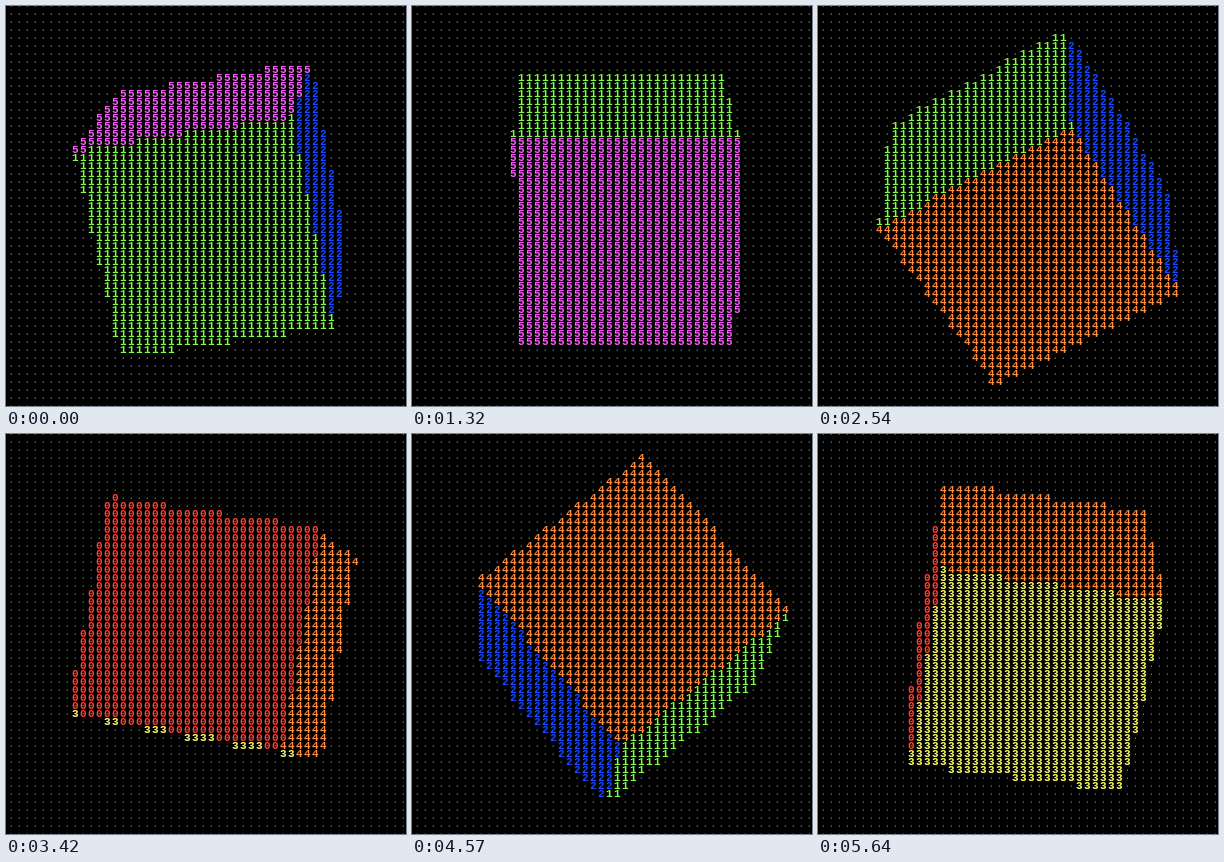
Recreate the animation shown at these times as an HTML page with a canvas. Size 400 px wide and 400 px high, loop 5740 ms.

```html
<!DOCTYPE html>
<html lang="en">
<head>
<meta charset="utf-8">
<title>Digit cube</title>
<style>
  html, body { margin: 0; width: 100%; height: 100%; overflow: hidden; background: #000; }
  canvas { display: block; width: 400px; height: 400px; }
</style>
</head>
<body>
<canvas id="stage" width="400" height="400"></canvas>
<script>
const ctx = document.getElementById('stage').getContext('2d');
const LOOP = 5740, LAST = 97;
const CELL = 8, COLS = 50, ROWS = 51;
const CENTER = [212, 199.5], HALF = 105.5, DEPTH = 18;
const COLORS = ['#ff4438', '#80ff48', '#1848ff', '#ffff68', '#ff9044', '#ff5cff'];
const DOT = '#626262';

// step number and the time in ms at which it appears
const BEATS = [[0, 0], [10, 580], [22, 1270], [33, 1900], [44, 2540], [52, 3010], [59, 3420],
  [63, 3650], [72, 4170], [79, 4570], [83, 4810], [92, 5350], [LAST, 5640]];

// Rounds up early, so that a step is on screen when its time comes.
function stepAt(ms) {
  for (let i = 1; i < BEATS.length; i++) {
    const [s0, t0] = BEATS[i - 1], [s1, t1] = BEATS[i];
    if (ms < t1) return Math.floor(s0 + (s1 - s0) * (ms - t0) / (t1 - t0) + 0.3);
  }
  return LAST;
}

const rad = deg => deg * Math.PI / 180;
const mix = (a, p, b, q) => p.map((v, i) => a * v + b * q[i]);
const neg = v => v.map(n => -n);
const dot = (p, q) => p[0] * q[0] + p[1] * q[1] + p[2] * q[2];

// Outward normals of faces 0..5; x right, y down, z towards the viewer.
function normals(step) {
  const tilt = rad(13.4 + 7.18 * step);
  const spin = rad(123.3 + 5.36 * step);
  const roll = rad(129.3 - 3.6 * step);
  const x = [1, 0, 0];
  const u = [0, Math.cos(roll), Math.sin(roll)];
  const v = [0, -Math.sin(roll), Math.cos(roll)];
  const p = mix(Math.sin(tilt), x, -Math.cos(tilt), u);
  const n2 = mix(Math.cos(tilt), x, Math.sin(tilt), u);
  const n1 = mix(Math.cos(spin), p, -Math.sin(spin), v);
  const n4 = mix(Math.sin(spin), p, Math.cos(spin), v);
  return [neg(n2), n1, n2, neg(n1), n4, neg(n4)];
}

// The face seen through a point of the stage, or -1.
function faceAt(px, py, n) {
  const ray = [(px - CENTER[0]) / (HALF * DEPTH), (py - CENTER[1]) / (HALF * DEPTH), -1];
  return n.findIndex(normal => {
    if (normal[2] * DEPTH <= 1) return false;
    const t = (1 - normal[2] * DEPTH) / dot(normal, ray);
    const hit = [t * ray[0], t * ray[1], DEPTH - t];
    return t > 0 && n.every(other => dot(other, hit) <= 1.0001);
  });
}

function draw(step) {
  const n = normals(step);
  ctx.fillStyle = '#000';
  ctx.fillRect(0, 0, 400, 400);
  ctx.textAlign = 'center';
  ctx.textBaseline = 'alphabetic';
  for (let row = 0; row < ROWS; row++) {
    for (let col = 0; col < COLS; col++) {
      const x = col * CELL + 5, y = row * CELL - 0.5;
      const id = faceAt(x, y, n);
      ctx.fillStyle = id < 0 ? DOT : COLORS[id];
      ctx.font = (id < 0 ? '' : 'bold ') + '11px "Liberation Mono", monospace';
      ctx.fillText(id < 0 ? '·' : id, x + 0.3, y + 3.5);
    }
  }
}

const start = performance.now();
let shown = -1;
function tick() {
  const step = stepAt((performance.now() - start) % LOOP);
  if (step !== shown) draw(shown = step);
  requestAnimationFrame(tick);
}
tick();
</script>
</body>
</html>
```
